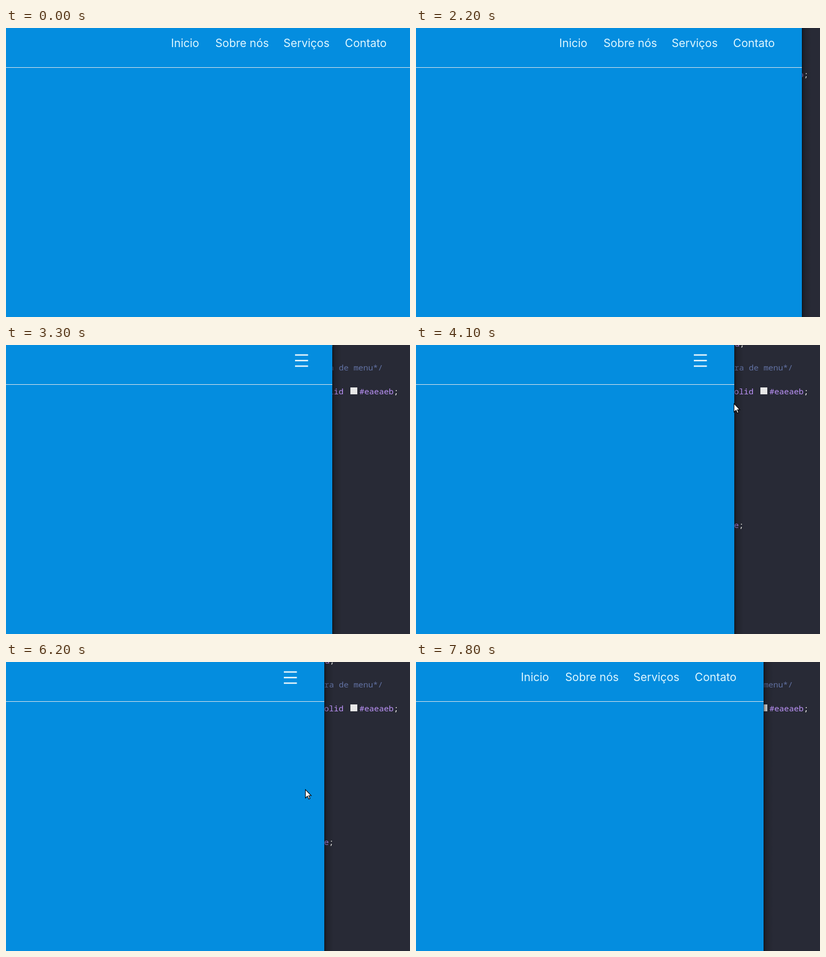
Animation of 759x545 px, one loop 8 s. Source, as an HTML page with a canvas:

```html
<!DOCTYPE html>
<html lang="pt">
<head>
<meta charset="utf-8">
<style>
  html, body { margin: 0; width: 100%; height: 100%; overflow: hidden; background: #282a36; }
  canvas { display: block; }
</style>
</head>
<body>
<canvas id="stage" width="759" height="545"></canvas>
<script>
const ctx = document.getElementById('stage').getContext('2d');
const LOOP = 8000, STEP = 100, HEIGHT = 545, BREAKPOINT = 620;
const BLUE = '#048ddf', LINE = '#eaeaeb', TEXT = '#e0f8ff';
const PURPLE = '#bd93f9', COMMENT = '#6272a4', PLAIN = '#f8f8f2';

// [time, right edge of the page]
const widthKeys = [
  [0, 766], [1700, 766], [1800, 763], [2500, 697], [2600, 697], [2700, 690],
  [3200, 638], [3300, 613], [3400, 605], [3500, 602], [3600, 601], [3700, 601],
  [3900, 598], [7300, 598], [7400, 599], [7500, 607], [7600, 625], [7700, 640], [7800, 653]
];

// [time, shape, x, y], held until the next entry
const cursorKeys = [
  [0], [100, 'arrow', 34, 296], [200, 'arrow', 643, 0], [300],
  [4100, 'arrow', 597, 110], [4200, 'arrow', 575, 82], [4300, 'arrow', 552, 54],
  [4400, 'hand', 527, 34], [4500, 'hand', 523, 27], [5200, 'hand', 523, 29],
  [6200, 'arrow', 562, 240], [6300, 'arrow', 626, 504], [6400]
];

const cursorShapes = {
  arrow: new Path2D('M.5 .5V16.5L4.3 13L6.8 18.5L9.2 17.5L6.8 12H11.5Z'),
  hand: new Path2D('M6 14.5V2.5Q6 .7 7.4 .7T8.9 2.5V8Q11.2 6.8 11.8 9Q14 8 14.6 10Q17.3 9.2 17.3 12V16Q17.3 18 15.5 20V23H7.5V20.5L1.3 14Q.2 12 2.2 11.4Q3.6 11 6 14.5Z')
};

// [label, centre's offset from the right edge, baseline in the open menu, line below]
const items = [
  ['Inicio', 429.5, 123, 160], ['Sobre nós', 322.5, 211, 249],
  ['Serviços', 201.5, 300, 337], ['Contato', 90, 388, 425]
];

function pageWidth(t) {
  const next = widthKeys.findIndex(key => key[0] > t);
  if (next < 0) return widthKeys.at(-1)[1];
  const [t0, w0] = widthKeys[next - 1], [t1, w1] = widthKeys[next];
  return w0 + (w1 - w0) * (t - t0) / (t1 - t0);
}

function rect(color, x, y, w, h) {
  ctx.fillStyle = color;
  ctx.fillRect(x, y, w, h);
}

function write(text, x, y, color) {
  ctx.fillStyle = color;
  ctx.fillText(text, x, y);
}

function drawEditor() {
  rect('#282a36', 0, 0, 759, HEIGHT);
  ctx.font = '15.3px "Noto Sans Mono", monospace';
  ctx.textAlign = 'left';
  write('a', 599, 3, PURPLE);
  write(';', 608, 3, PLAIN);
  write('barra de menu*/', 570.3, 48, COMMENT);
  write('solid', 588.3, 93, PURPLE);
  rect('#e8e8e8', 647, 80, 13, 13);
  write('#eaeaeb', 664, 93, PURPLE);
  write(';', 728.3, 93, PLAIN);
  write('e', 597.3, 345, PURPLE);
  write(';', 606.5, 345, PLAIN);
}

function drawShadow(x) {
  const shade = ctx.createLinearGradient(x, 0, x + 18, 0);
  shade.addColorStop(0, 'rgba(0,0,0,.4)');
  shade.addColorStop(.35, 'rgba(0,0,0,.15)');
  shade.addColorStop(1, 'rgba(0,0,0,0)');
  rect(shade, x, 0, 18, HEIGHT);
  rect('rgba(0,0,0,.4)', x, 0, 1, HEIGHT);
}

function drawPage(t, width) {
  rect(BLUE, 0, 0, width, HEIGHT);
  rect(LINE, 0, 74, width, 1);
  ctx.font = '21px Inter, sans-serif';
  ctx.textAlign = 'center';
  if (width >= BREAKPOINT) {
    for (const [label, offset] of items) write(label, width - offset, 36, TEXT);
    return;
  }
  // The icon trails the window edge slightly while resizing
  const iconX = Math.round(pageWidth(t - 25)) - 76;
  for (const y of [17.5, 28, 38.5]) rect('#e6f4fb', iconX, y, 24.5, 2.7);
  if (t < 4700 || t >= 6000) return;
  for (const [label, , baseline, line] of items) {
    write(label, width / 2 - 2, baseline, TEXT);
    rect(LINE, 0, line, width, 1);
  }
}

function drawCursor(t) {
  const [, shape, x, y] = cursorKeys.findLast(key => key[0] <= t);
  if (!shape) return;
  ctx.save();
  ctx.translate(x, y);
  ctx.fillStyle = '#fff';
  ctx.strokeStyle = '#000';
  ctx.lineWidth = 1.1;
  ctx.fill(cursorShapes[shape]);
  ctx.stroke(cursorShapes[shape]);
  if (shape === 'hand') {
    ctx.stroke(new Path2D('M8.9 8V12M11.8 9V12.5M14.6 10V13'));
  }
  ctx.restore();
}

function draw() {
  const t = Math.floor(performance.now() % LOOP / STEP) * STEP;
  const width = Math.round(pageWidth(t));
  drawEditor();
  drawShadow(width);
  drawPage(t, width);
  drawCursor(t);
  requestAnimationFrame(draw);
}
draw();
</script>
</body>
</html>
```
